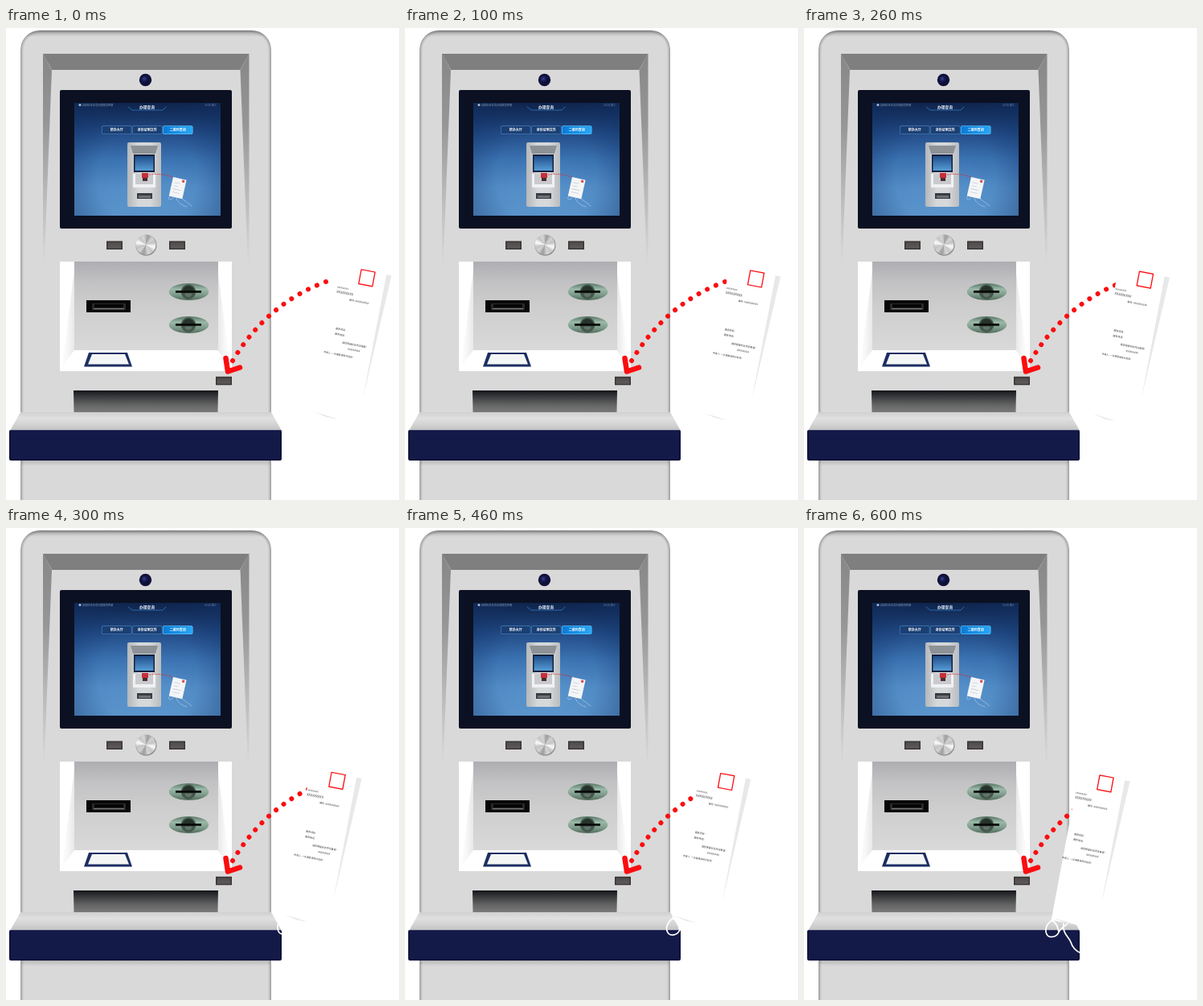
Recreate the animation shown at these times as an HTML page with a canvas. Size 489 by 586 pixels, loop 700 ms.

```html
<!DOCTYPE html>
<html lang="zh">
<head>
<meta charset="utf-8">
<style>
html, body { margin: 0; width: 100%; height: 100%; overflow: hidden; background: #fff; }
canvas { display: block; }
</style>
</head>
<body>
<canvas id="stage" width="489" height="586"></canvas>
<script>
const c = document.getElementById('stage').getContext('2d');
const STEP = 100, STEPS = 7;
const RED = '#fb0d10', BODY = '#d9d9d9', MID = 174.25;

function spread(g, colors) {
  colors.forEach((col, i) => g.addColorStop(i / (colors.length - 1), col));
  return g;
}
const down = (y0, y1, ...colors) => spread(c.createLinearGradient(0, y0, 0, y1), colors);
const across = (x0, x1, ...colors) => spread(c.createLinearGradient(x0, 0, x1, 0), colors);
const glow = (x, y, r, ...colors) => spread(c.createRadialGradient(x, y, 0, x, y, r), colors);

function rect(fill, x, y, w, h, r = 0) {
  c.fillStyle = fill;
  c.beginPath();
  c.roundRect(x, y, w, h, r);
  c.fill();
}
function shape(fill, d) {
  c.fillStyle = fill;
  c.fill(new Path2D(d));
}
// Symmetric trapezoid given by its middle and two half widths.
function trapezoid(fill, mid, top, half0, bottom, half1) {
  shape(fill, `M${mid - half0} ${top}H${mid + half0}L${mid + half1} ${bottom}H${mid - half1}Z`);
}
function oval(fill, x, y, rx, ry = rx, from = 0, to = 2 * Math.PI) {
  c.fillStyle = fill;
  c.beginPath();
  c.ellipse(x, y, rx, ry, 0, from, to);
  c.fill();
}
function line(color, width, d, dash = []) {
  c.strokeStyle = color;
  c.lineWidth = width;
  c.lineCap = c.lineJoin = 'round';
  c.setLineDash(dash);
  c.stroke(new Path2D(d));
  c.setLineDash([]);
}
function text(s, x, y, size, color, weight = 400, align = 'left') {
  c.font = `${weight} ${size}px "Noto Sans CJK SC", "Noto Sans CJK", "Noto Sans", sans-serif`;
  c.fillStyle = color;
  c.textAlign = align;
  c.fillText(s, x, y);
}
// Runs a drawing in moved and turned coordinates.
function at(x, y, angle, paint) {
  c.save();
  c.translate(x, y);
  c.rotate(angle);
  paint();
  c.restore();
}
function mirrored(paint) {
  paint();
  c.save();
  c.translate(2 * MID, 0);
  c.scale(-1, 1);
  paint();
  c.restore();
}

function body() {
  c.save();
  c.beginPath();
  c.roundRect(18, 3, 312, 620, 24);
  c.clip();
  c.fillStyle = BODY;
  c.fill();
  c.strokeStyle = 'rgba(0,0,0,.09)';
  for (const w of [2, 4, 7]) { c.lineWidth = w; c.stroke(); }
  rect(down(3, 11, 'rgba(0,0,0,.24)', 'rgba(0,0,0,0)'), 18, 3, 312, 8);
  c.restore();

  // recess around the screen
  mirrored(() => shape(down(32, 295, '#878787', '#969696', '#bababa', BODY), 'M46 32L57 52L47.5 295H46Z'));
  trapezoid('#7f7f7f', MID, 32, 128.3, 52, 117);

  oval('#10123a', 173.5, 64.5, 7.7);
  oval(glow(172, 63, 6, '#39418a', '#171b55', '#0b0d30'), 173.5, 64.5, 5);
}

function miniKiosk() {
  rect(across(151, 193, '#b4b7ba', '#d6d8da', '#d6d8da', '#b9bcbf'), 151, 142, 42, 80, 2);
  trapezoid('#8d9297', 172, 146, 17, 156, 14);
  rect('#14213f', 159, 157, 26, 22);
  rect(down(158, 178, '#1d4a85', '#5aa0da'), 160.5, 159, 23, 18);
  rect('#f0f1f2', 158, 181, 28, 17);
  rect('#c8cacd', 161, 181, 22, 13);
  rect('#c4303a', 169, 180, 8, 6);
  rect('#4c2c30', 170, 186, 6, 4);
  rect('#3a3e44', 163, 205, 19, 7);
  rect('#6e7278', 165, 208, 15, 3);
}

function screen() {
  rect('#0b1122', 67, 77, 214, 172, 2);
  rect(down(93, 233, '#0e1f42', '#234c87', '#3d76b6', '#5792cc', '#5f9bd3'), 85, 93, 182, 140);
  rect(glow(176, 185, 125, 'rgba(16,48,100,0)', 'rgba(16,48,100,.08)', 'rgba(16,48,100,.6)'), 85, 93, 182, 140);

  oval('#aebdd3', 92, 95.5, 1.5);
  text('自助综合业务办理服务终端', 95, 97, 3.2, '#8798b3');
  text('10:25 周三', 247, 97, 3.2, '#7e8fab');
  line('#2e78bd', .8, 'M152 98L157 102H195L199 98');
  text('办理查询', 175.5, 100.3, 4.7, '#e8f3ff', 700, 'center');

  ['帮办大厅', '身份证明文件', '二维码查询'].forEach((label, i) => {
    const x = 119 + 38 * i, on = i === 2;
    rect(on ? '#58c3ff' : '#447cb5', x, 121.3, 37.5, 10.7, 2);
    rect(on ? across(x, x + 37, '#0b79d5', '#28a8f5') : '#1b3f73', x + .7, 122, 36.1, 9.3, 1.5);
    text(label, x + 18.7, 128.4, 4, '#fff', 700, 'center');
  });

  miniKiosk();
  line('#e02a35', 1, 'M209 186Q197 180 178 182', [1, 2]);
  at(208, 185, .22, () => {
    rect('#f3f5f7', 0, 0, 17, 24);
    rect('#d94b50', 12, 1, 3, 3);
    for (let y = 6; y < 20; y += 4) rect('#b9bdc3', 3, y, 6 + y % 5, .6);
  });
  line('rgba(205,226,244,.6)', .8, 'M204 209C200 212 204 215 208 211M212 211C213 216 218 220 225 222M219 212Q225 216 231 221');
}

function button(x, y) {
  rect('#393535', x, y, 20, 10.5);
  rect(down(y, y + 10, '#4c4848', '#605c5c'), x + 1.5, y + 1.5, 17, 7.5);
}

function knob() {
  const shine = c.createConicGradient(0, 174, 269);
  for (let i = 0; i <= 48; i++) {
    const a = i / 48 * 2 * Math.PI;
    const l = 80 + 10 * Math.sin(2 * a + 1) + 7 * Math.sin(6 * a);
    shine.addColorStop(i / 48, `hsl(0 0% ${l}%)`);
  }
  oval('#8f8f8f', 174.5, 269.8, 13);
  oval(shine, 174, 269, 12.4);
}

function reader(y) {
  oval(down(y - 10, y + 10, '#5c7a6a', '#9ab8a7', '#7f9d8d', '#56705f'), 227.5, y, 24.7, 10.5);
  oval('#45574d', 227, y, 9.3);
  oval('#26322c', 227, y, 7.5, 7.5, Math.PI, 0);
  oval('#61746a', 227, y + 2, 4.5, 4.5, 0, Math.PI);
  rect('#090b0a', 211, y - 1.5, 32, 2.8);
}

function bay() {
  rect('#fff', 67, 290, 214, 136);
  mirrored(() => shape(across(67, 85, '#fff', '#f8f8f8', '#e8e8e8'), 'M85 300V400L70 420Z'));
  rect(down(290, 400, '#aeaeb2', '#c3c3c5', '#cdcdcd', '#d3d3d3', '#d9d9d9'), 85, 290, 179, 110);

  rect('#070707', 100, 338, 55, 15);
  rect('#292929', 107, 342, 42, 8);
  rect('#050505', 110, 343, 36, 4);
  rect('#777', 109, 348, 38, 1.3);
  reader(327.5);
  reader(368.5);

  trapezoid('#1d2e62', 127, 403, 24, 420.5, 30);
  trapezoid('#f4f6f6', 127.5, 405, 20.5, 417.5, 25.5);
}

function shelf() {
  trapezoid(down(450, 477, '#14161a', '#3e4042', '#646464', '#7a7a7a'), 174, 450, 90, 477, 89.5);
  trapezoid(down(477, 500, '#d0d0d0', '#e0e0e0', '#d3d3d3', '#c0c0c0'), 174, 477, 156, 500, 169);
  rect('#0c1036', 4, 499, 339, 38, 2);
  rect('#141a48', 5.5, 500.5, 336, 35);
  rect('#343b6b', 5, 499, 337, 1);
  rect(down(537, 544, 'rgba(0,0,0,.15)', 'rgba(0,0,0,0)'), 19, 537, 310, 7);
}

function arrow() {
  line(RED, 6, 'M398 315Q325 342 282 413', [.01, 11.9]);
  line(RED, 6.5, 'M273.5 410L276 426.5L291 421.5');
}

function paper(step) {
  at(-12.35 * step, 1.17 * step, 0, () => {
    at(416, 297, .185, () => {
      rect('#fff', 0, -7, 64, 40);
      rect('#fff', 0, 0, 57, 186);
      shape('#e8e8e8', 'M58 -1.5H64.5L57.5 155Z');
      shape('#e4e4e4', 'M2 182.5L32 186H18Z');
      c.strokeStyle = RED;
      c.lineWidth = 1.3;
      c.strokeRect(26.2, -2, 17.4, 18);

      const print = (s, x, y, size = 3) => text(s, x, y, size, '#333');
      print('XXXXXXXXX', .8, 25.8, 2.7);
      print('XXXXXXXXX', .9, 31.9, 4.1);
      print('编号: XXXXXXXXXX', 18.4, 38.8);
      print('服务项目:', 8.3, 76.8);
      print('服务电话:', 8.5, 83.4);
      print('请您保留好此凭证备查!', 19.4, 92.5);
      print('XXXXXXXXX', 27.7, 99.1);
      print('申请人: 一次满意请核对信息!', -1, 108.1, 2.9);
    });
    // outline of the holding hand
    line('#fff', 1.7, 'M383 480C377 483 373 491 376 497C379 503 388 501 391 495C393 490 398 488 402 484' +
      'M383 480Q390 485 391 495M397 484C395 496 404 501 406 507Q409 517 419 521');
  });
}

function draw() {
  const step = Math.floor(performance.now() / STEP) % STEPS;
  c.clearRect(0, 0, 489, 586);
  body();
  screen();
  button(125, 264.5);
  button(203, 264.5);
  knob();
  bay();
  button(261, 432.8);
  shelf();
  arrow();
  paper(step);
  requestAnimationFrame(draw);
}
draw();
</script>
</body>
</html>
```
